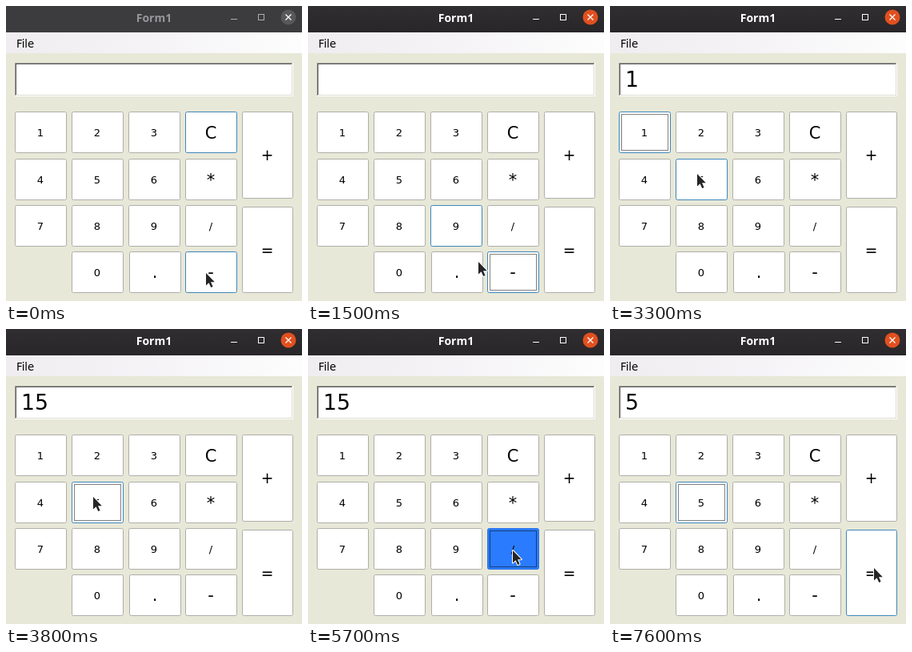
Animation, 370 px wide and 369 px high, one loop 8 s. Source, as an HTML page with a canvas:

```html
<!DOCTYPE html>
<html lang="en">
<head>
<meta charset="utf-8">
<title>Form1</title>
<style>
html, body { margin: 0; width: 100%; height: 100%; overflow: hidden; background: #e8e8d8; }
canvas { display: block; }
</style>
</head>
<body>
<canvas id="view" width="370" height="369"></canvas>
<script>
const ctx = document.getElementById('view').getContext('2d');
const LOOP = 8000, STEP = 100;
const SANS = '"DejaVu Sans", sans-serif';
const BLUE = '#3d87bb';

// label, x, y, width, height, font size, baseline
const buttons = [
  ...[...'123456789'].map((d, i) => {
    const row = Math.floor(i / 3), y = [132, 191, 249][row];
    return [d, 11 + i % 3 * 71, y, 65, 52, 13, [163, 222, 280][row]];
  }),
  ['0', 82, 307, 65, 52, 13, 338],
  ['.', 154, 307, 65, 52, 21, 340],
  ['C', 224, 132, 65, 52, 21, 166],
  ['*', 224, 191, 65, 52, 21, 225],
  ['/', 224, 249, 65, 52, 13, 280],
  ['-', 224, 307, 65, 52, 21, 340],
  ['+', 295, 132, 64, 109, 18.7, 193],
  ['=', 295, 251, 64, 108, 18.7, 312],
].map(([label, x, y, w, h, size, base]) => ({ label, x, y, w, h, size, base }));

const smooth = u => (1 - Math.cos(u * Math.PI)) / 2;
const easeOut = u => Math.sin(u * Math.PI / 2);

// Pointer moves: start time, steps, target, easing, vertical lead
const moves = [
  [1500, 1, 213, 320, easeOut, 1],
  [1600, 6, 46, 165, easeOut, 1],
  [3100, 3, 109, 210, smooth, 1],
  [4400, 5, 251, 276, smooth, 0.5],
  [5300, 1, 256, 277, smooth, 1],
  [6100, 4, 125, 209, smooth, 1],
  [7100, 6, 330, 299, smooth, 1],
];

// Clicks: press time, release time, button, display afterwards
const clicks = [
  [900, 1000, '-', ''],
  [2700, 2700, '1', '1'],
  [3600, 3800, '5', '15'],
  [5700, 5800, '/', '15'],
  [6600, 6800, '5', '5'],
];

// Hover runs one step ahead of the drawn pointer during a move
function pointer(t, ahead) {
  let x = 250, y = 334;
  for (const [start, steps, tx, ty, ease, lead] of moves) {
    if (t < start) break;
    const k = Math.floor((t - start) / STEP) + 1 + ahead;
    if (ahead && k > steps && start === 1500) { x = tx; y = ty; continue; }
    const u = ease(Math.min(1, k / steps));
    x += (tx - x) * u;
    y += (ty - y) * u ** lead;
  }
  // The first move flows straight into the second
  if (ahead && t >= 1500 && t < 1600) return pointer(1600, 0);
  return { x: Math.round(x), y: Math.round(y) };
}

function rect(x, y, w, h, color) {
  ctx.fillStyle = color;
  ctx.fillRect(x, y, w, h);
}

function text(str, x, y, font, color = '#000', align = 'left') {
  ctx.font = font;
  ctx.fillStyle = color;
  ctx.textAlign = align;
  ctx.fillText(str, x, y);
}

function gradient(x, y, ...colors) {
  const g = ctx.createLinearGradient(0, 0, x, y);
  colors.forEach((c, i) => g.addColorStop(i / (colors.length - 1), c));
  return g;
}

function drawWindow(active, display) {
  const ink = active ? '#fff' : '#b0aeac';
  rect(0, 0, 370, 369, '#e8e8d8');
  rect(0, 0, 370, 33, active ? gradient(0, 33, '#302e30', '#282628') : '#3c3b3d');
  text('Form1', 185, 20, 'bold 14px "Noto Sans", "Open Sans", sans-serif', active ? '#fff' : '#98969a', 'center');
  rect(281, 16, 8, 1, ink);
  ctx.lineWidth = 1;
  ctx.strokeStyle = ink;
  ctx.strokeRect(315.5, 10.5, 7, 7);

  ctx.fillStyle = active ? '#e1501f' : '#58575a';
  ctx.beginPath();
  ctx.arc(353, 14, 9.5, 0, Math.PI * 2);
  ctx.fill();
  ctx.strokeStyle = '#fff';
  ctx.lineWidth = 1.3;
  ctx.beginPath();
  ctx.moveTo(349.5, 10.5); ctx.lineTo(356.5, 17.5);
  ctx.moveTo(356.5, 10.5); ctx.lineTo(349.5, 17.5);
  ctx.stroke();

  rect(0, 33, 370, 26, gradient(370, 0, '#efedef', '#f5f3f6', '#fdfdfd'));
  text('File', 13, 52, '13.3px ' + SANS);

  rect(11, 71, 348, 42, '#fff');
  rect(11, 71, 347, 1, '#9c9c98');
  rect(11, 71, 1, 41, '#9c9c98');
  rect(12, 72, 345, 1, '#5c5c5a');
  rect(12, 72, 1, 39, '#5c5c5a');
  rect(12, 111, 346, 1, '#dedcd4');
  rect(357, 72, 1, 40, '#dedcd4');
  text(display, 19, 101, '26.7px ' + SANS);
}

function drawButton(b, lit, focused, pressed) {
  ctx.beginPath();
  ctx.roundRect(b.x + 0.5, b.y + 0.5, b.w - 1, b.h - 1, 2);
  ctx.fillStyle = pressed ? '#2a7bfd' : '#fff';
  ctx.fill();
  ctx.lineWidth = 1;
  ctx.strokeStyle = pressed ? '#2a76ee' : lit ? BLUE : '#aeaeaa';
  ctx.stroke();
  if (focused) {
    ctx.strokeStyle = '#000';
    ctx.setLineDash([1, 1]);
    ctx.strokeRect(b.x + 3.5, b.y + 3.5, b.w - 7, b.h - 7);
    ctx.setLineDash([]);
  }
  text(b.label, b.x + b.w / 2 - 0.5, b.base, b.size + 'px ' + SANS, '#000', 'center');
}

const arrow = new Path2D('M0 0V15.5L3.6 12.2L6.2 18L8.6 17L6 11.2H10.8Z');

function drawPointer({ x, y }) {
  ctx.save();
  ctx.translate(x, y);
  ctx.lineJoin = 'round';
  ctx.lineWidth = 2;
  ctx.strokeStyle = '#fff';
  ctx.stroke(arrow);
  ctx.fillStyle = '#262426';
  ctx.fill(arrow);
  ctx.restore();
}

function draw(t) {
  let focus = 'C', down = false, display = '';
  for (const [press, release, label, result] of clicks) {
    if (t < press) break;
    focus = label;
    down = t < release;
    if (!down) display = result;
  }
  const active = t >= 900;
  const spot = pointer(t, 1);
  drawWindow(active, display);
  for (const b of buttons) {
    const hover = spot.x >= b.x && spot.x < b.x + b.w && spot.y >= b.y && spot.y < b.y + b.h;
    const focused = b.label === focus;
    drawButton(b, hover || focused, focused && active, focused && down);
  }
  drawPointer(pointer(t, 0));
}

const begin = performance.now();
function tick() {
  draw((performance.now() - begin) % LOOP);
  requestAnimationFrame(tick);
}
tick();
</script>
</body>
</html>
```
